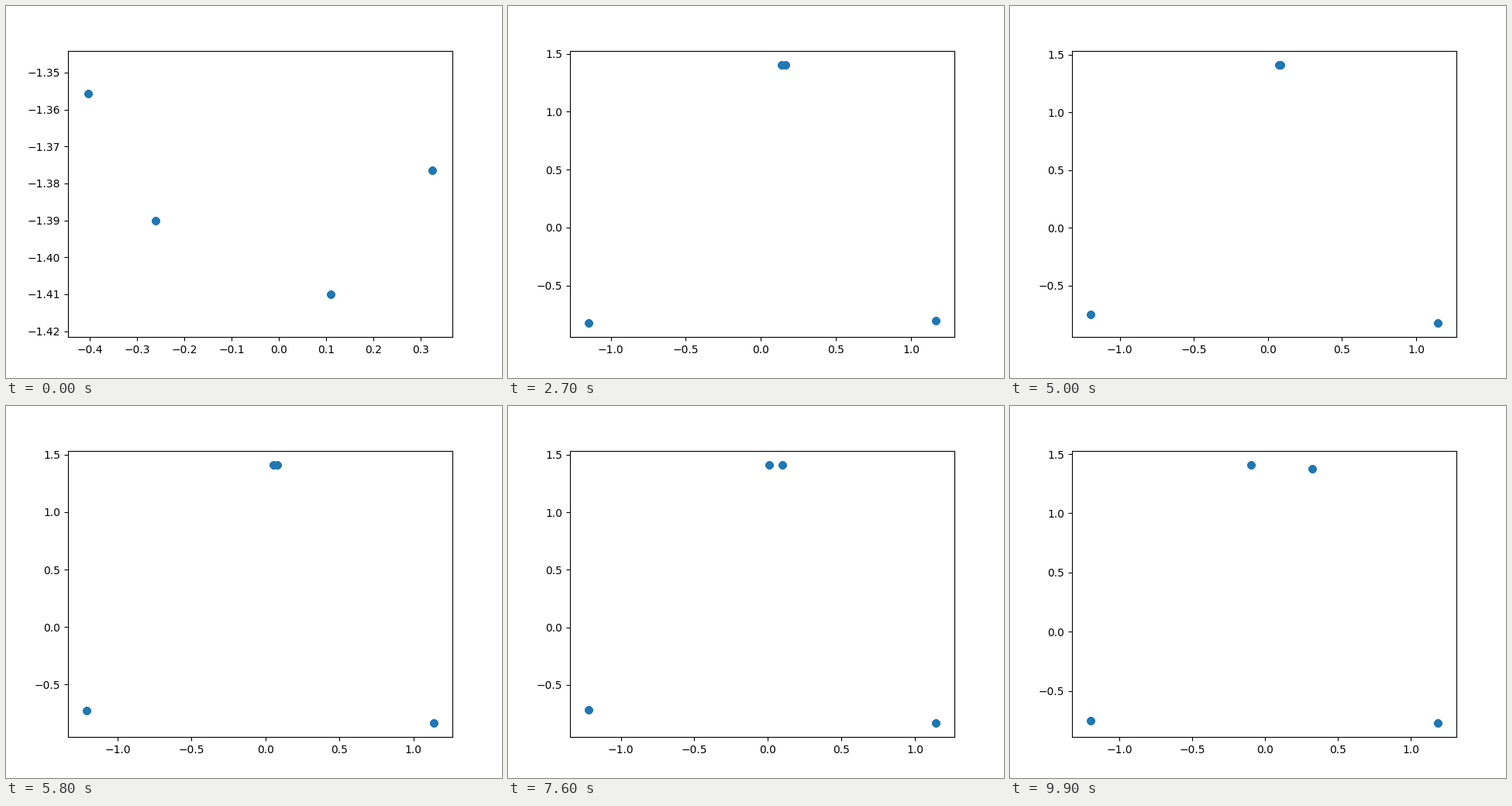
Write a matplotlib script that moves like this. It is 640 by 480 pixels and loops after 10000 ms.

```python
import numpy as np
import matplotlib.pyplot as plt
from matplotlib.animation import FuncAnimation

FRAMES, INTERVAL = 100, 100
RADIUS = np.sqrt(2)
STACK = 60            # coincident particles per visible dot
AXES_PX = np.array([496, 369.6])
MARKER_PX = 3         # marker radius counted into the data limits
LAUNCH = 5.5          # steps in which the opening burst fades

t = np.arange(FRAMES)


def launch_from(start, settled):
    """Burst from the start value into the settled motion."""
    return settled + (start - settled[0]) * np.exp(-(t / LAUNCH) ** 2)


def pair(center, gap):
    """Two angles placed evenly about a shared center."""
    return [center + gap / 2, center - gap / 2]


# All angles in degrees. The upper pair meets, then drifts apart ever faster.
split = 17.1 * np.exp(0.0664 * (t - FRAMES + 1))
top_gap = launch_from(330.2, 11.5 * np.exp(-0.09 * t) - split)
top_center = launch_from(88.36, 90.5 - 13.4 * np.exp(-t / 38) - 0.24 * split)

# The lower pair spreads to the sides and sways slowly.
low_gap = launch_from(344.94, 250.5 - 0.055 * t + 65 * np.exp(-0.15 * t))
low_center = launch_from(86.91, 88.9 - 1.95 * np.cos(2 * np.pi * (t - 69) / 100))

angles = np.radians(pair(top_center, top_gap) + pair(low_center, low_gap))

fig, ax = plt.subplots(figsize=(6.4, 4.8), dpi=100)
dots = ax.scatter(np.zeros(4 * STACK), np.zeros(4 * STACK), color="C0")


def update(i):
    a = angles[:, i]
    pos = RADIUS * np.column_stack([np.cos(a), np.sin(a)])
    dots.set_offsets(np.repeat(pos, STACK, axis=0))

    pad = MARKER_PX / AXES_PX
    low, high = pos.min(axis=0) - pad, pos.max(axis=0) + pad
    margin = 0.05 * (high - low)
    low, high = low - margin, high + margin
    ax.set_xlim(low[0], high[0])
    ax.set_ylim(low[1], high[1])
    return dots,


anim = FuncAnimation(fig, update, frames=FRAMES, interval=INTERVAL,
                     init_func=lambda: update(0), repeat=True, repeat_delay=0)
plt.show()
```
